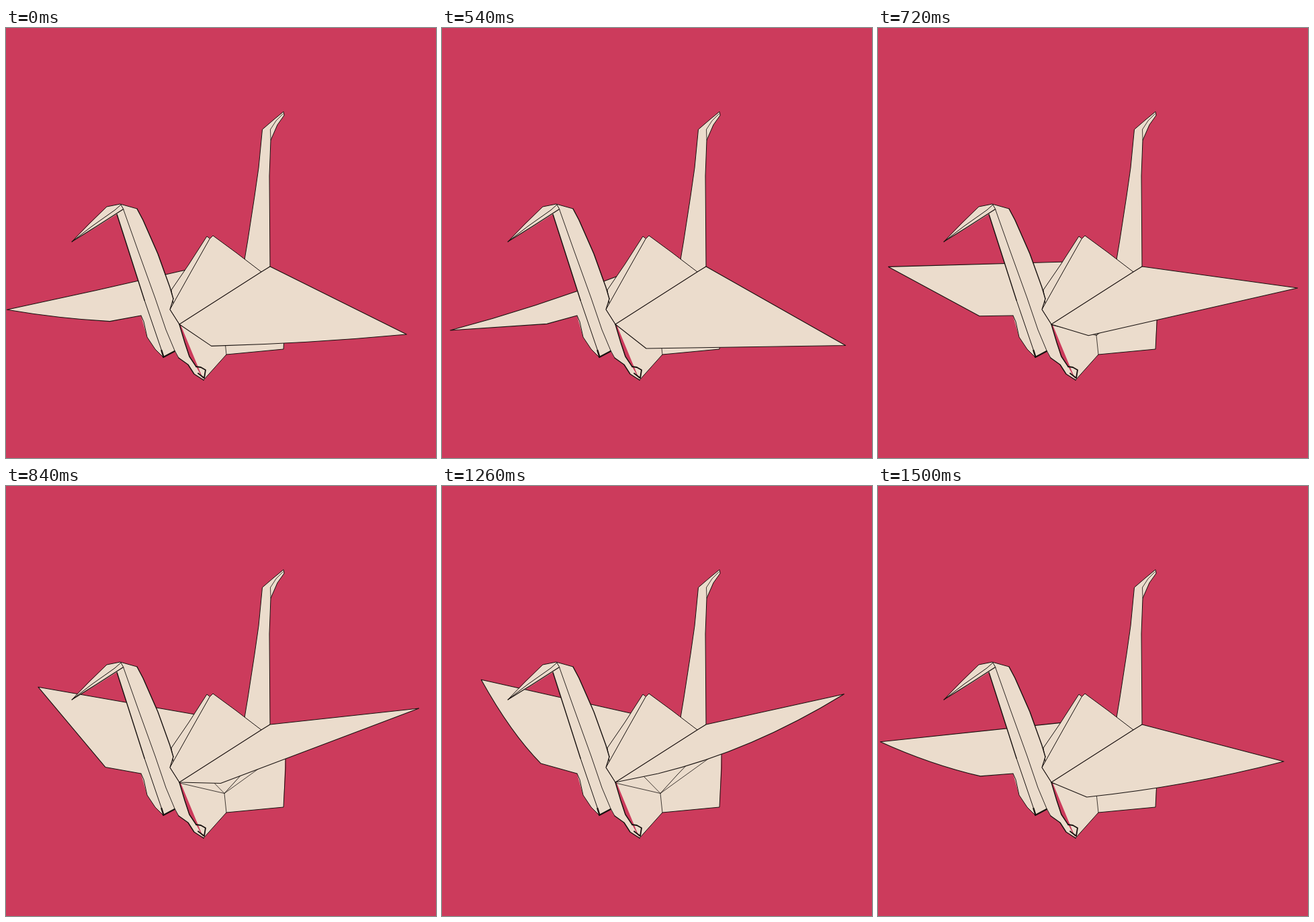
Write an HTML page with a canvas that moves like this. It is 640 px wide and 640 px high and loops after 1.56 s.

```html
<!DOCTYPE html>
<html lang="en">
<head>
<meta charset="utf-8">
<title>Paper crane</title>
<style>
html, body { margin: 0; width: 100%; height: 100%; overflow: hidden; background: #cc3b5c; }
canvas { display: block; width: 100vw; height: 100vh; }
</style>
</head>
<body>
<canvas id="stage" width="640" height="640"></canvas>
<script>
const ctx = document.getElementById('stage').getContext('2d');
const BACK = '#cc3b5c', PAPER = '#ebdccc', INK = '#17110f';
const LOOP = 1560, TICK = 60, BOTTOM = 300, FALL = 1260;
// Ticks that keep the previous drawing.
const HELD = [1, 3, 6, 8, 15, 17, 20];

const sigmoid = x => 1 / (1 + Math.exp(-x));

// Wing height from 0 to 1: a sigmoid rise followed by a sigmoid drop.
const liftAt = (t, rise, riseSpan, drop, dropSpan) =>
  sigmoid((t - rise) / riseSpan) - sigmoid((t - drop) / dropSpan);

// Sideways swing of a tip, widest at half height.
const swing = h => (4 * h * (1 - h)) ** .7;

// Extra raise of the wing's inner corner near the top of the stroke.
const snap = h => h ** 12;

function poly(...list) {
  const path = new Path2D();
  for (let i = 0; i < list.length; i += 2) path.lineTo(list[i], list[i + 1]);
  return path;
}

// Curve from a to b, its middle moved down by sag.
function bow(path, a, b, sag) {
  path.quadraticCurveTo((a[0] + b[0]) / 2, (a[1] + b[1]) / 2 + 2 * sag, ...b);
}

function fill(path) {
  ctx.fillStyle = PAPER;
  ctx.fill(path);
}

function ink(path, width = 1) {
  ctx.lineWidth = width;
  ctx.stroke(path);
}

function sheet(path, width) {
  fill(path);
  ink(path, width);
}

const line = (width, ...list) => ink(poly(...list), width);

function drawFarWing(t) {
  const h = liftAt(t, 695, 61, 1490, 62), falling = t >= FALL;
  const tip = [23 + 44 * h - (falling ? 40 : 35) * swing(h), 463 - 179 * h];
  const end = [256 + 31 * Math.sqrt(h), 379 - 40 * Math.sqrt(h)];
  const corner = [157 - 10 * h, 442 - 22 * h - 10 * snap(h)];
  const edge = new Path2D();
  edge.moveTo(...end);
  bow(edge, end, tip, 7 * (1 - h) ** 8);
  bow(edge, tip, corner, falling ? 9 * h : 0);
  edge.lineTo(201, 428);
  const paper = new Path2D(edge);
  paper.lineTo(255, 425);
  fill(paper);
  ink(edge, 1.1);
}

function drawNearWing(t) {
  const h = liftAt(t, 701, 72, 1488, 49), falling = t >= FALL;
  const tip = [583 + 14 * h + (falling ? 15 : 34) * swing(h), 490 - 182 * h];
  const corner = [302 + 20 * h, 481 - 41 * h - 14 * snap(h)];
  const wing = poly(258, 441, 380, 363, 393, 355, ...tip);
  bow(wing, tip, corner, falling ? 13 * h : 0);
  wing.closePath();
  sheet(wing, 1.1);
}

function drawTail() {
  sheet(poly(355,345, 360,315, 370,250, 376,208, 381.5,151, 399,136, 413,124.5,
    414,130, 404,144, 394,167, 392,220, 393,355, 380,364));
  line(.8, 394,167, 393.5,151, 402,138, 412,128);
}

function drawBelly() {
  fill(poly(300,432, 372,402, 411,389, 416,394, 413,478, 328,486, 294,524, 258,437));
  line(1, 412,390, 416,394, 416,420, 413,478, 328,486, 294,524);
  line(.8, 258,442, 325,457.5, 328,486);
  line(.8, 300,432, 325,457.5, 413,394);
  line(.9, 325,457.5, 350,430, 373,406);
}

function drawHump() {
  sheet(poly(304,314, 299,310, 272,352, 246,390, 249,410));
  sheet(poly(258,441, 244,419, 277,360, 303,314, 308,309, 342,334, 380,363));
}

function drawNeck() {
  fill(poly(165,277, 174,265, 195,269, 204,286, 226,336, 249,403, 244,419, 258,441,
    272,488, 283,504, 294,524, 280,515, 271,501, 257,491, 251,481, 234,490,
    222,478, 210,460, 201,428, 206,405, 197,376));
  line(1, 201,428, 205,437, 210,460, 222,478, 234,490);
  line(1.4, 165,277, 182,330, 206,405);
  line(1, 206,405, 232,481);
  line(.9, 174,268, 196,330, 222,402, 238,449, 251,480, 257,491);
  line(1.4, 195,269, 204,286, 226,336, 244,386, 249,403);
  line(2, 234,490, 251,481);
  line(2.4, 231.5,480, 234,488);
}

function drawHead() {
  fill(poly(98,318, 150,266, 170,262, 195,269, 174,270, 165,277, 135,296));
  line(1, 98,318, 124,291, 150,266, 170,262, 195,269);
  line(1, 98,318, 128,295, 162,271, 171,263, 175,270);
  line(1.3, 98,318, 135,295, 174,270);
}

function drawFoot() {
  line(1.1, 249,403, 244,419, 258,441);
  line(1.4, 258,441, 266,468, 273,489, 283,504);
  line(1.4, 257,491, 271,501, 280,515, 294,524);
  line(1.8, 283,504, 290,505, 297,509, 295,521, 286,514);
}

function draw(t) {
  ctx.fillStyle = BACK;
  ctx.fillRect(0, 0, 640, 640);
  ctx.strokeStyle = INK;
  ctx.lineJoin = ctx.lineCap = 'round';
  drawFarWing(t);
  drawTail();
  drawBelly();
  drawHump();
  drawNeck();
  drawHead();
  drawNearWing(t);
  drawFoot();
}

function run() {
  let tick = Math.floor(performance.now() % LOOP / TICK);
  if (HELD.includes(tick)) tick--;
  const t = tick * TICK;
  // The stroke is counted from its lowest point, so early times follow the drop.
  draw(t < BOTTOM ? t + LOOP : t);
  requestAnimationFrame(run);
}
run();
</script>
</body>
</html>
```
